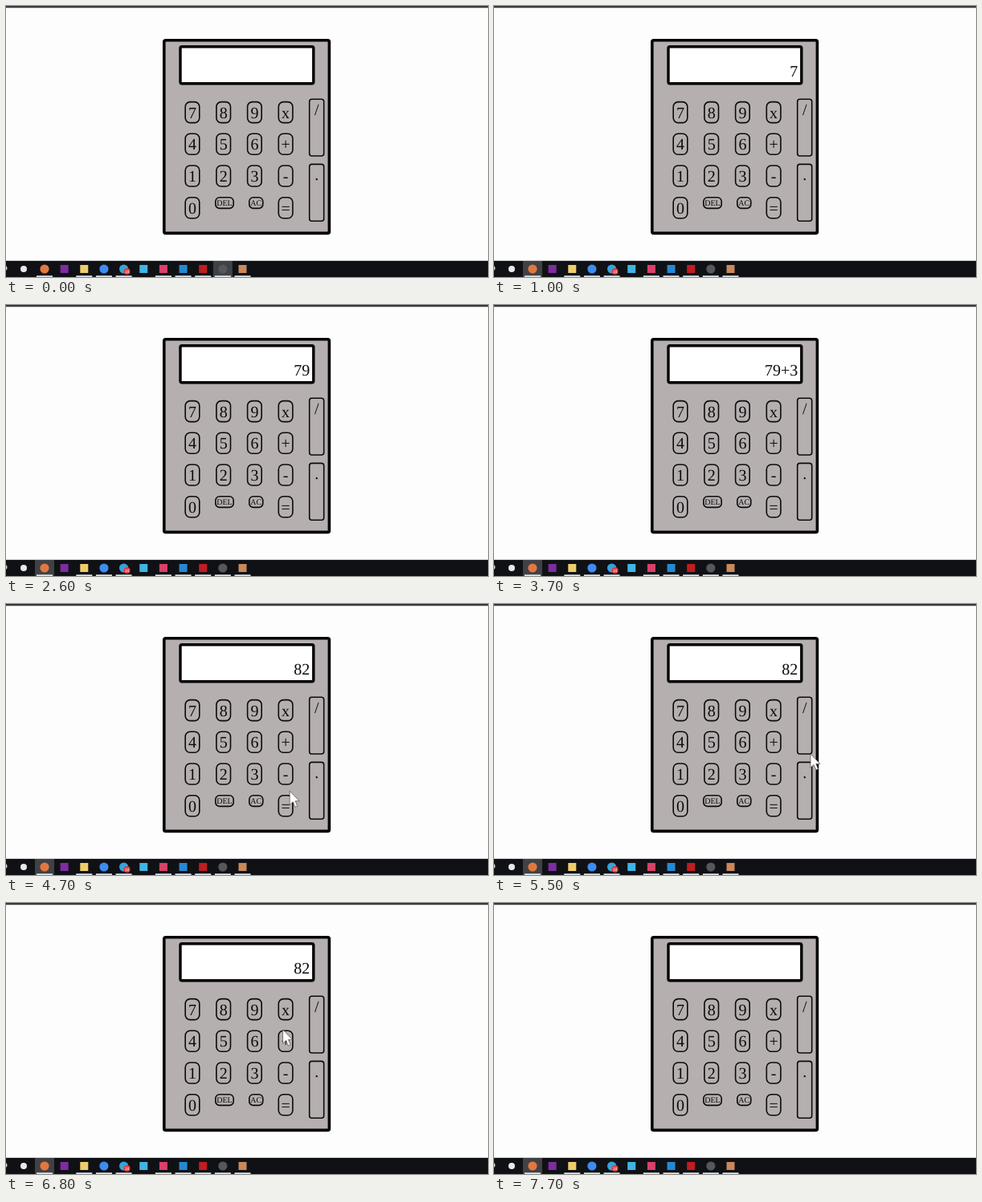
An HTML page that plays this animation: 600 px wide and 338 px high, repeating every 8 s.

```html
<!DOCTYPE html>
<html lang="en">
<head>
<meta charset="utf-8">
<title>Calculator</title>
<style>
  html, body { margin: 0; width: 100%; height: 100%; overflow: hidden; background: #fefdfe; }
  svg { display: block; width: 100vw; height: 100vh; }
  text {
    font-family: "Liberation Serif", "Times New Roman", serif;
    font-size: 20px; fill: #0c0b0b; text-rendering: geometricPrecision;
  }
  .key { fill: none; stroke: #0c0b0b; stroke-width: 1.6; }
</style>
</head>
<body>
<svg viewBox="0 0 600 338" preserveAspectRatio="none">
  <rect width="600" height="338" fill="#fefdfe"/>
  <rect width="600" height="2.3" fill="#39383b"/>
  <rect x="196.8" y="42.8" width="205.6" height="240.6" rx="2" fill="#b5afb0" stroke="#000" stroke-width="3.6"/>
  <rect x="217" y="50.8" width="165.8" height="46" rx="2" fill="#fff" stroke="#000" stroke-width="3.4"/>
  <g id="keys"></g>
  <text id="display" x="378.2" y="88.4" text-anchor="end"></text>
  <g id="bar"><rect y="317.8" width="600" height="20.2" fill="#101115"/></g>
  <path id="cursor" d="M0 0V17.2L4 13.4L6.8 20L9.6 18.8L6.8 12.4H12Z"
        fill="#fff" stroke="#4b494b" stroke-width=".7" stroke-linejoin="round"/>
</svg>
<script>
const $ = id => document.getElementById(id);
const LOOP = 8000, STEP = 100;

function add(parent, tag, attrs, label) {
  const el = document.createElementNS("http://www.w3.org/2000/svg", tag);
  for (const k in attrs) el.setAttribute(k, attrs[k]);
  if (label) el.textContent = label;
  parent.append(el);
  return el;
}

// Keys; each one remembers where the pointer tip rests on it
const tips = {};
function key(label, x, y, w, h, r, drop, size = 20) {
  add($("keys"), "rect", { class: "key", x, y, width: w, height: h, rx: r });
  add($("keys"), "text", {
    x: x + w / 2, y: y + drop, "text-anchor": "middle", style: `font-size:${size}px`
  }, label);
  tips[label] = [x + w / 2 - 4, y + h / 2 - 8];
}

["789x", "456+", "123-", "0  ="].forEach((row, r) => {
  [...row].forEach((label, c) => {
    if (label !== " ") key(label, 223.2 + c * 38.7, 119.6 + r * 39.7, 17.6, 26, 6, 20);
  });
});
key("DEL", 260.8, 238.8, 22.4, 13.6, 5, 10.2, 10);
key("AC", 302.8, 238.8, 17, 13.6, 5, 10.2, 10);
key("/", 377.7, 116.2, 18, 70.8, 3, 19.8);
key(".", 377.7, 197.4, 18, 70.8, 3, 19.8);

// Taskbar: evenly spaced apps, some round, most of them running
const bar = $("bar");
const appX = i => 48 + i * 24.65;
const dot = (cx, cy, r, fill) => add(bar, "circle", { cx, cy, r, fill });
const glow = add(bar, "rect", { y: 318, width: 24, height: 20, fill: "#404145" });

dot(-1.5, 327, 3, "#d5d5d7");
dot(22, 328, 4, "#e8e8ea");
["#e2783f", "#7d2da0", "#efcd6b", "#3d8cf0", "#35a3dc", "#40b4e4",
 "#d94168", "#2489d2", "#c01d20", "#55575c", "#c9895a"].forEach((fill, i) => {
  const x = appX(i);
  if ([0, 3, 4, 9].includes(i)) dot(x, 328, 5.6, fill);
  else add(bar, "rect", { x: x - 5, y: 323, width: 10, height: 10, fill });
  if (i !== 1 && i !== 5)
    add(bar, "rect", { x: x - 10, y: 336.3, width: 20, height: 1.7, fill: "#dde8ee" });
});
dot(appX(4) + 4, 331, 4, "#e0383c");
add(bar, "text", {
  x: appX(4) + 4, y: 333, "text-anchor": "middle", style: "font:5px Arial,sans-serif;fill:#fff"
}, "18");

// Pointer stops: a key label is pressed on arrival, a point is only passed
const stops = [
  [100, [268, 322]], [500, [420, 225]], [1000, "7"], [2000, "9"], [3000, "+"], [3700, "3"],
  [4400, "="], [5500, [394, 187]], [6800, [344.6, 158]], [7300, "AC"], [7700, "7"]
];
const rests = [[1000, 1100], [2600, 2800], [3700, 3800]];
const place = stop => tips[stop[1]] || stop[1];
const ease = u => u * u * (3 - 2 * u);

function pointerAt(t) {
  const i = stops.findIndex(s => s[0] > t);
  if (i < 1 || rests.some(([from, to]) => t >= from && t < to)) return null;
  const [a, b] = [stops[i - 1], stops[i]];
  const u = ease((t - a[0]) / (b[0] - a[0]));
  return place(a).map((v, n) => v + (place(b)[n] - v) * u);
}

function press(text, label) {
  if (label === "AC") return "";
  if (label === "=") return String(text.split("+").reduce((sum, n) => sum + +n, 0));
  return text + label;
}

function readout(t) {
  return stops
    .filter(([at, target]) => at <= t && at < 7700 && typeof target === "string")
    .reduce((text, [, label]) => press(text, label), "");
}

function draw(ms) {
  const t = Math.floor((ms % LOOP) / STEP) * STEP;
  $("display").textContent = readout(t);
  glow.setAttribute("x", appX(t < 600 ? 9 : 0) - 12);
  const p = pointerAt(t);
  $("cursor").style.display = p ? "" : "none";
  if (p) $("cursor").setAttribute("transform", `translate(${p})`);
}

const start = performance.now();
function frame() {
  draw(performance.now() - start);
  requestAnimationFrame(frame);
}
frame();
</script>
</body>
</html>
```
